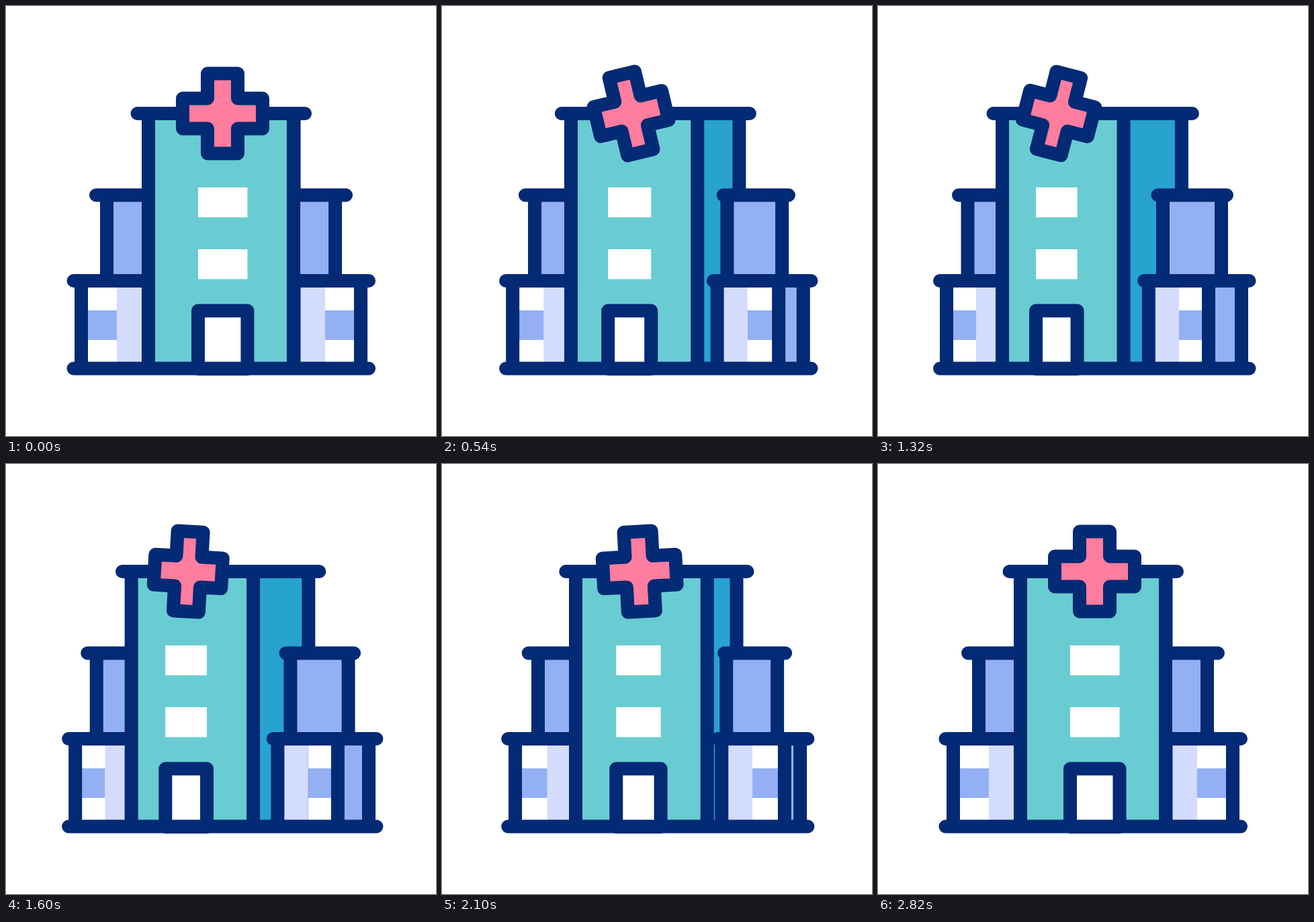
An HTML page without scripts that plays this animation: 640 by 640 pixels, repeating every 3600 ms.

```html
<!DOCTYPE html>
<html lang="en">
<head>
<meta charset="utf-8">
<title>Hospital</title>
<style>
/* g: ground, l: left wing, m/n: left/right middle wing, t: tower, r: right wing, w: windows */
@property --g0 {syntax: "<length>"; inherits: true; initial-value: 0px}
@property --g1 {syntax: "<length>"; inherits: true; initial-value: 0px}
@property --l0 {syntax: "<length>"; inherits: true; initial-value: 0px}
@property --l1 {syntax: "<length>"; inherits: true; initial-value: 0px}
@property --m-roof {syntax: "<length>"; inherits: true; initial-value: 0px}
@property --m0 {syntax: "<length>"; inherits: true; initial-value: 0px}
@property --n-roof0 {syntax: "<length>"; inherits: true; initial-value: 0px}
@property --n-roof1 {syntax: "<length>"; inherits: true; initial-value: 0px}
@property --n0 {syntax: "<length>"; inherits: true; initial-value: 0px}
@property --n1 {syntax: "<length>"; inherits: true; initial-value: 0px}
@property --t-roof0 {syntax: "<length>"; inherits: true; initial-value: 0px}
@property --t-roof1 {syntax: "<length>"; inherits: true; initial-value: 0px}
@property --t0 {syntax: "<length>"; inherits: true; initial-value: 0px}
@property --t1 {syntax: "<length>"; inherits: true; initial-value: 0px}
@property --t2 {syntax: "<length>"; inherits: true; initial-value: 0px}
@property --r-roof {syntax: "<length>"; inherits: true; initial-value: 0px}
@property --r0 {syntax: "<length>"; inherits: true; initial-value: 0px}
@property --r1 {syntax: "<length>"; inherits: true; initial-value: 0px}
@property --r2 {syntax: "<length>"; inherits: true; initial-value: 0px}
@property --r3 {syntax: "<length>"; inherits: true; initial-value: 0px}
@property --w0 {syntax: "<length>"; inherits: true; initial-value: 0px}
@property --w1 {syntax: "<length>"; inherits: true; initial-value: 0px}
@property --cx {syntax: "<length>"; inherits: true; initial-value: 0px}
@property --squash {syntax: "<number>"; inherits: true; initial-value: 1}
@property --tilt {syntax: "<angle>"; inherits: true; initial-value: 0deg}

html, body {margin: 0; width: 100%; height: 100%; overflow: hidden; background: #fff}
svg {
  display: block; width: 100%; height: 100%;
  animation: turn 3.6s infinite, sway 3.6s infinite;
}
.fill {x: var(--a); width: calc(var(--b) - var(--a))}
.wall {x: calc(var(--a) - 10px); width: 20px}
.roof {x: var(--a); width: calc(var(--b) - var(--a)); height: 20px; rx: 10px}
.wall, .roof {fill: #032a75}
.white {fill: #fff}
.teal {fill: #69ccd2}
.side {fill: #28a2cf}
.blue {fill: #94b0f4}
.pale {fill: #d3dcfd}
.win {--a: var(--w0); --b: var(--w1)}
.line {stroke: #032a75; stroke-width: 20; stroke-linejoin: round}
.cross {
  fill: #ff7d9f; vector-effect: non-scaling-stroke;
  transform: translate(var(--cx), 160px) rotate(var(--tilt)) scaleX(var(--squash));
}

@keyframes turn {
  0%, 78.333%, 100% {
    --g0: 90.5px; --g1: 550px; --l0: 112px; --l1: 165px; --m-roof: 124px; --m0: 150px;
    --n-roof0: 420px; --n-roof1: 516px; --n0: 428px; --n1: 490px;
    --t-roof0: 185.5px; --t-roof1: 455px; --t0: 212px; --t1: 428px; --t2: 428.5px;
    --r-roof: 418px; --r0: 428.5px; --r1: 475px; --r2: 528px; --r3: 528px;
    --w0: 286px; --w1: 359.5px; --cx: 322.5px; --squash: 1;
    animation-timing-function: cubic-bezier(.333, .348, .667, .695);
  }
  8.889% {
    --g0: 88px; --g1: 556px; --l0: 108.5px; --l1: 156.5px; --m-roof: 118px; --m0: 143px;
    --n-roof0: 411px; --n-roof1: 523px; --n0: 425px; --n1: 501px;
    --t-roof0: 174.5px; --t-roof1: 462px; --t0: 199px; --t1: 396px; --t2: 436.5px;
    --r-roof: 402px; --r0: 417px; --r1: 462px; --r2: 510.5px; --r3: 534.5px;
    --w0: 260px; --w1: 327px; --cx: 295px; --squash: .91;
    animation-timing-function: cubic-bezier(.333, .459, .667, .822);
  }
  21.667% {
    --g0: 83px; --g1: 562px; --l0: 102.8px; --l1: 147.5px; --m-roof: 111px; --m0: 134.5px;
    --n-roof0: 407px; --n-roof1: 528px; --n0: 424px; --n1: 509.7px;
    --t-roof0: 163px; --t-roof1: 472px; --t0: 187px; --t1: 369px; --t2: 446.5px;
    --r-roof: 388px; --r0: 404.3px; --r1: 449.5px; --r2: 494.5px; --r3: 540px;
    --w0: 238px; --w1: 300px; --cx: 272px; --squash: .85;
    animation-timing-function: cubic-bezier(.333, .6, .667, 1);
  }
  38.889% {
    --g0: 82px; --g1: 562.5px; --l0: 102px; --l1: 146px; --m-roof: 110px; --m0: 133.5px;
    --n-roof0: 406.5px; --n-roof1: 529px; --n0: 424px; --n1: 511px;
    --t-roof0: 161.5px; --t-roof1: 478px; --t0: 185px; --t1: 365.5px; --t2: 452px;
    --r-roof: 386px; --r0: 402.8px; --r1: 448px; --r2: 492px; --r3: 541px;
    --w0: 235px; --w1: 296.5px; --cx: 269px; --squash: .84;
    animation-timing-function: cubic-bezier(.333, 0, .667, .38);
  }
  50.556% {
    --g0: 86.5px; --g1: 558px; --l0: 106.7px; --l1: 151.5px; --m-roof: 115px; --m0: 138.5px;
    --n-roof0: 406.5px; --n-roof1: 525px; --n0: 421.5px; --n1: 505px;
    --t-roof0: 167.5px; --t-roof1: 471px; --t0: 191.5px; --t1: 375.7px; --t2: 445px;
    --r-roof: 393px; --r0: 409px; --r1: 454.5px; --r2: 499.5px; --r3: 536.8px;
    --w0: 244px; --w1: 306.5px; --cx: 278px; --squash: .86;
    animation-timing-function: cubic-bezier(.333, .285, .667, .715);
  }
  66.667% {
    --g0: 90px; --g1: 550.5px; --l0: 111.5px; --l1: 162px; --m-roof: 122.5px; --m0: 147.8px;
    --n-roof0: 414px; --n-roof1: 517px; --n0: 425px; --n1: 492.8px;
    --t-roof0: 181.5px; --t-roof1: 457.5px; --t0: 207px; --t1: 415px; --t2: 431.5px;
    --r-roof: 408px; --r0: 424px; --r1: 470px; --r2: 521px; --r3: 529px;
    --w0: 275.5px; --w1: 346px; --cx: 311.5px; --squash: .97;
    animation-timing-function: cubic-bezier(.333, .62, .667, 1);
  }
}
@keyframes sway {
  0%, 4.722%, 66.667%, 100% {--tilt: 0deg; animation-timing-function: cubic-bezier(.37, 0, .63, 1)}
  21.667% {--tilt: -20deg; animation-timing-function: cubic-bezier(.37, 0, .63, 1)}
  36.667% {--tilt: 14.4deg; animation-timing-function: cubic-bezier(.37, 0, .63, 1)}
  51.111% {--tilt: -5.4deg; animation-timing-function: cubic-bezier(.37, 0, .63, 1)}
}
</style>
</head>
<body>
<svg viewBox="0 0 640 640">
  <!-- left wings -->
  <g style="--b: var(--t0)">
    <rect class="fill blue" style="--a: var(--m0)" y="281" height="128"/>
    <rect class="fill pale" style="--a: var(--l1)" y="409" height="130"/>
    <rect class="fill blue" style="--a: var(--l0); --b: var(--l1)" y="453" height="44"/>
    <rect class="wall" style="--a: var(--m0)" y="281" height="128"/>
    <rect class="wall" style="--a: var(--l0)" y="409" height="130"/>
    <rect class="roof" style="--a: var(--m-roof); --b: calc(var(--t0) + 5px)" y="271.5"/>
    <rect class="roof" style="--a: var(--g0); --b: calc(var(--t0) + 5px)" y="399"/>
  </g>

  <!-- tower -->
  <rect class="fill side" style="--a: var(--t1); --b: var(--t2)" y="160" height="379"/>
  <rect class="fill teal" style="--a: var(--t0); --b: var(--t1)" y="160" height="379"/>
  <rect class="wall" style="--a: var(--t2)" y="160" height="379"/>

  <!-- right wings -->
  <rect class="fill blue" style="--a: var(--n0); --b: var(--n1)" y="281" height="128"/>
  <rect class="wall" style="--a: var(--n0)" y="281" height="128"/>
  <rect class="wall" style="--a: var(--n1)" y="281" height="128"/>
  <rect class="roof" style="--a: var(--n-roof0); --b: var(--n-roof1)" y="271.5"/>
  <rect class="fill pale" style="--a: var(--r0); --b: var(--r1)" y="409" height="130"/>
  <rect class="fill white" style="--a: var(--r1); --b: var(--r2)" y="409" height="130"/>
  <rect class="fill blue" style="--a: var(--r1); --b: var(--r2)" y="453" height="44"/>
  <rect class="fill blue" style="--a: var(--r2); --b: var(--r3)" y="409" height="130"/>
  <rect class="wall" style="--a: var(--r0)" y="409" height="130"/>
  <rect class="wall" style="--a: var(--r2)" y="409" height="130"/>
  <rect class="wall" style="--a: var(--r3)" y="409" height="130"/>
  <rect class="roof" style="--a: var(--r-roof); --b: var(--g1)" y="399"/>

  <!-- tower front -->
  <rect class="wall" style="--a: var(--t0)" y="160" height="379"/>
  <rect class="wall" style="--a: var(--t1)" y="160" height="379"/>
  <rect class="roof" style="--a: var(--t-roof0); --b: var(--t-roof1)" y="150"/>
  <rect class="fill win white" y="270" height="44.5"/>
  <rect class="fill win white" y="362" height="44.5"/>
  <rect class="fill win white line" y="453.5" height="86.5"/>
  <rect class="roof" style="--a: var(--g0); --b: var(--g1)" y="529.5"/>

  <path class="cross line" d="M-22.5-59.5h45v37h37v45h-37v37h-45v-37h-37v-45h37z"/>
</svg>
</body>
</html>
```
